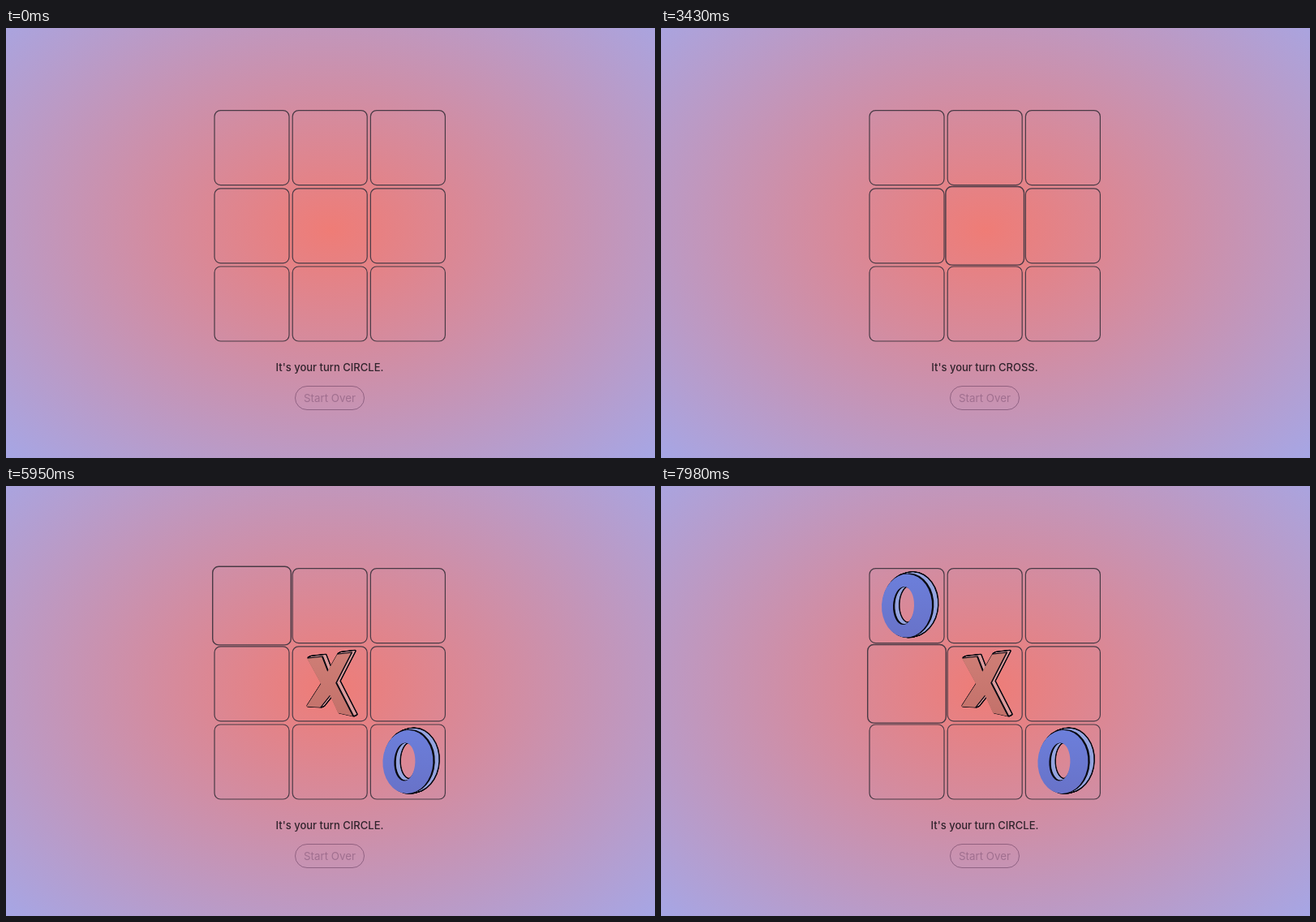
Write an HTML page with a canvas that moves like this. It is 800 px wide and 530 px high and loops after 8 s.

```html
<!DOCTYPE html>
<html lang="en">
<head>
<meta charset="utf-8">
<title>Tic-tac-toe</title>
<style>
  html, body { margin: 0; width: 100%; height: 100%; overflow: hidden; }
  body {
    position: relative;
    background: radial-gradient(ellipse farthest-corner at center 47%, #ef7c76, #a6a6e5);
    font-family: Inter, sans-serif;
  }
  canvas { position: absolute; left: 0; top: 0; }
  .label { position: absolute; text-align: center; white-space: nowrap; }
  #status {
    left: 299px; top: 408px; width: 200px;
    font-size: 13px; font-weight: 500; line-height: 20px; color: #30232c;
  }
  #restart {
    left: 356px; top: 441px; width: 84px; height: 28px;
    border: 1px solid rgba(90, 50, 85, .5); border-radius: 15px;
    font-size: 13.3px; line-height: 29px; color: rgba(90, 50, 85, .36);
  }
</style>
</head>
<body>
<canvas id="board" width="800" height="530"></canvas>
<div id="status" class="label"></div>
<div id="restart" class="label">Start Over</div>
<script>
const LOOP = 8000;
const HOVER_FADE = 180;
const SPIN = 900;
const ctx = document.getElementById('board').getContext('2d');
const status = document.getElementById('status');

// Cells are numbered row by row from 0 to 8.
const hovers = [
  { cell: 8, from: 1400, to: 3200 },
  { cell: 4, from: 3230, to: 5720 },
  { cell: 0, from: 5750, to: 7560 },
  { cell: 3, from: 7600, to: 9000 }
];
const clicks = [3100, 4340, 6500, 7800];
const marks = [
  { cell: 8, kind: 'O', at: 3500 },
  { cell: 4, kind: 'X', at: 4760 },
  { cell: 0, kind: 'O', at: 6900 }
];

const crossPoints = [
  [-28, -31], [-10, -33], [-3, -15], [9, -36], [26, -38], [7, -1],
  [28, 40], [10, 36], [0, 14], [-12, 29], [-29, 28], [-11, 0]
];
const styles = {
  O: { top: '#6c7fdb', bottom: '#6872c8', side: '#95a4df', depth: [7, -2], outline: ringPath },
  X: { top: '#cf7e76', bottom: '#c3716a', side: '#dc9b9c', depth: [5, -2.5], outline: crossPath }
};

const clamp = v => Math.max(0, Math.min(1, v));
const smooth = v => { v = clamp(v); return v * v * (3 - 2 * v); };
const cellCenter = i => [303 + 96.2 * (i % 3), 147.6 + 96.2 * Math.floor(i / 3)];

function ringPath(turn) {
  const path = new Path2D();
  path.ellipse(0, 0, 31, 39, .05, 0, Math.PI * 2);
  path.closePath();
  path.moveTo(9 + 4 * turn, 0);
  path.ellipse(-4 + 4 * turn, 0, 13, 23.5, .04, 0, Math.PI * 2);
  path.closePath();
  return path;
}

function crossPath() {
  const path = new Path2D();
  crossPoints.forEach(([x, y]) => path.lineTo(x, y));
  path.closePath();
  return path;
}

function drawCell(i, t) {
  const [x, y] = cellCenter(i);
  const lift = Math.max(0, ...hovers.filter(h => h.cell === i).map(h =>
    Math.min(smooth((t - h.from) / HOVER_FADE), 1 - smooth((t - h.to) / HOVER_FADE))));
  const half = 46 * (1 + .05 * lift);
  ctx.beginPath();
  ctx.roundRect(x - half, y - half, half * 2, half * 2, 7.5);
  ctx.lineWidth = 1.2 + .2 * lift;
  ctx.strokeStyle = '#493a45';
  ctx.stroke();
}

// An extruded mark: slices run from the back towards the face.
function drawMark({ cell, kind, at }, t) {
  const p = clamp((t - at) / SPIN);
  if (p <= 0) return;
  const style = styles[kind];
  const turn = 3 * (1 - p) ** 2;
  const size = 1 - (1 - clamp(p * 2.6)) ** 3;
  const [x, y] = cellCenter(cell);
  const [dx, dy] = style.depth;
  const back = [dx - 10 * turn, dy - 4 * turn];
  const path = style.outline(turn);

  const slice = (z, color, line) => {
    ctx.save();
    ctx.translate(x + 3 * turn, y);
    ctx.scale(size, size);
    ctx.translate(back[0] * z, back[1] * z);
    ctx.scale(1 + .156 * turn, 1 - .08 * turn);
    ctx.rotate(.35 * turn);
    ctx.fillStyle = color;
    ctx.fill(path, 'evenodd');
    if (line) {
      ctx.lineWidth = line;
      ctx.lineJoin = 'round';
      ctx.strokeStyle = color;
      ctx.stroke(path);
    }
    ctx.restore();
  };

  for (let z = 1; z > .3; z -= .05) slice(z, '#080810', 3);
  for (let z = 1; z > .3; z -= .05) slice(z, style.side);
  slice(.25, '#080810', 1.2);
  const face = ctx.createLinearGradient(0, -40, 0, 40);
  face.addColorStop(0, style.top);
  face.addColorStop(1, style.bottom);
  slice(0, face);
}

function draw(t) {
  ctx.clearRect(0, 0, 800, 530);
  for (let i = 0; i < 9; i++) drawCell(i, t);
  marks.forEach(mark => drawMark(mark, t));
  const turns = clicks.filter(time => t >= time).length;
  status.textContent = `It's your turn ${turns % 2 ? 'CROSS' : 'CIRCLE'}.`;
}

const start = performance.now();
function tick() {
  draw((performance.now() - start) % LOOP);
  requestAnimationFrame(tick);
}
tick();
</script>
</body>
</html>
```
